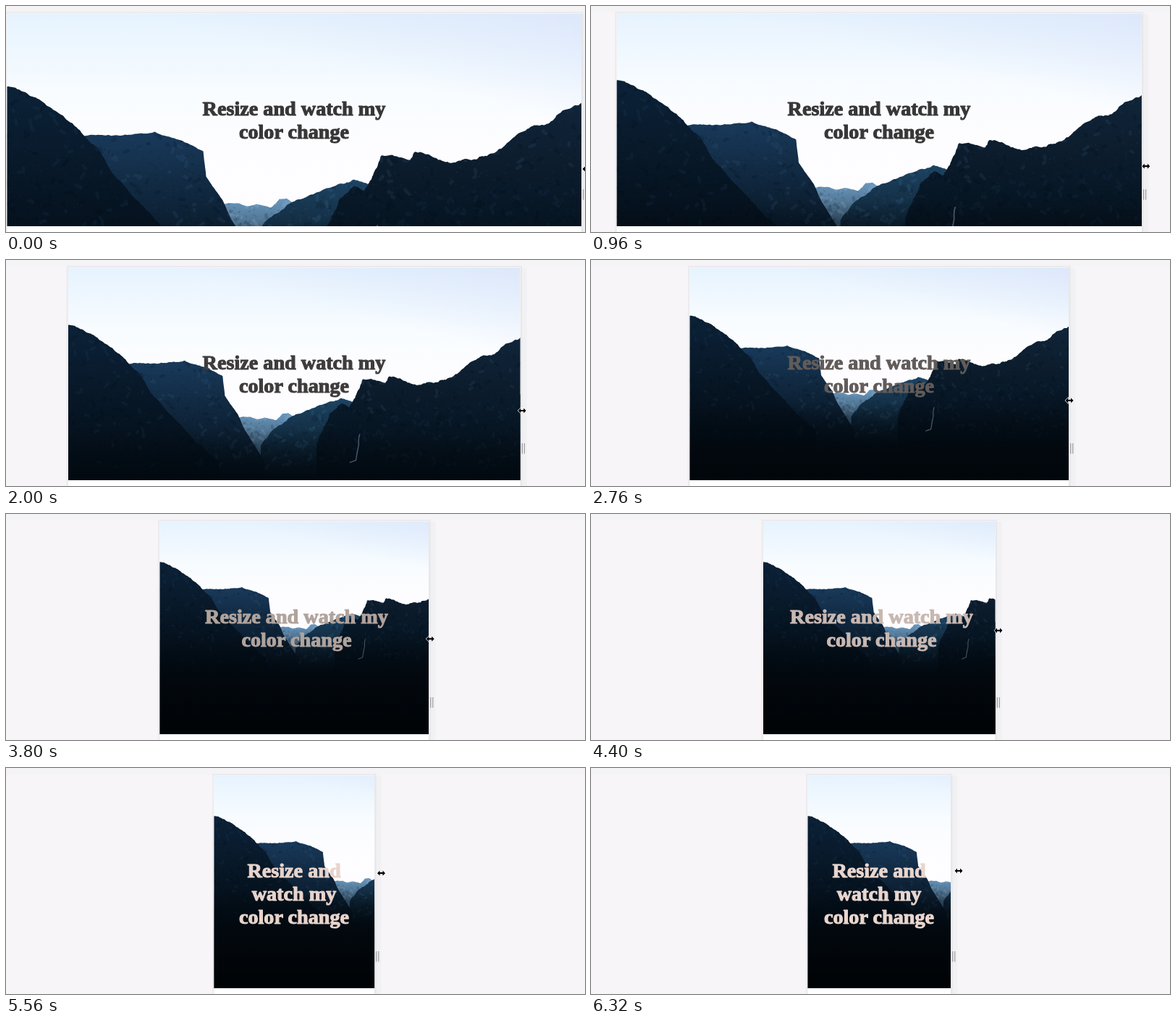
These frames come from a looping animation (800x312 px, 6.36 s). An HTML page:

```html
<!DOCTYPE html>
<html lang="en">
<head>
<meta charset="utf-8">
<title>Resize and watch my color change</title>
<style>
html, body { margin: 0; width: 100%; height: 100%; overflow: hidden; background: #f7f5f8; }
svg { display: block; }
#title { font: bold 28.2px "Liberation Serif", "Times New Roman", serif; text-anchor: middle; stroke-width: 1.1; stroke-linejoin: round; }
</style>
</head>
<body>
<svg id="stage" width="800" height="312" viewBox="0 0 800 312">
  <rect width="800" height="312" fill="#f7f5f8"/>
  <rect width="800" height="9" fill="#f4f3f5"/>
  <rect id="strip" y="10.5" height="302" fill="#f1f0f2"/>
  <rect id="shadow" y="9.5" height="330" fill="none" stroke="#000" stroke-width="3" opacity=".04"/>
  <rect id="card" y="10.5" height="310" fill="#fff"/>
  <svg id="photo" y="10.5" height="293.5" overflow="hidden"><g id="scene"></g></svg>
  <g id="title"></g>
  <path id="handle" d="M-1.5 253V267.5M1.5 253V267.5" stroke="#8c8b8d"/>
  <path id="cursor" d="M-5.5 0L-2 -3.6V-1.1H2V-3.6L5.5 0L2 3.6V1.1H-2V3.6Z" stroke="#fff" stroke-width="1.2" paint-order="stroke"/>
</svg>
<script>
const NS = 'http://www.w3.org/2000/svg';
const LOOP = 6360, STEP = 40;
const PHOTO_W = 793.5, PHOTO_H = 529, MIN_SCALE = 293.5 / PHOTO_H;
const $ = id => document.getElementById(id);
const clamp = v => Math.max(0, Math.min(1, v));
const mix = (a, b, u) => a + (b - a) * u;

function set(el, attrs) {
  for (const key in attrs) el.setAttribute(key, attrs[key]);
}
function add(parent, tag, attrs = {}) {
  const el = document.createElementNS(NS, tag);
  set(el, attrs);
  parent.append(el);
  return el;
}

let seed = 7;
const random = () => (seed = seed * 16807 % 2147483647) / 2147483647;
const spread = size => (random() - .5) * size;

// ---- landscape, in photo units ----
const scene = $('scene'), defs = add(scene, 'defs');

// Vertical gradient; each stop is [y, color, opacity].
function gradient(id, ...stops) {
  const g = add(defs, 'linearGradient', { id, gradientUnits: 'userSpaceOnUse', x1: 0, x2: 0, y1: 0, y2: PHOTO_H });
  for (const [y, color, opacity = 1] of stops)
    add(g, 'stop', { offset: y / PHOTO_H, 'stop-color': color, 'stop-opacity': opacity });
  return `url(#${id})`;
}

// Midpoint displacement turns a few key points into a rugged line.
function rugged([x, y], [nx, ny], rough) {
  const length = Math.hypot(nx - x, ny - y);
  if (length < 4) return [[nx, ny]];
  const bump = spread(rough * Math.min(2, Math.sqrt(length / 12)));
  const mid = [(x + nx) / 2 + bump * .3, (y + ny) / 2 + bump];
  return [...rugged([x, y], mid, rough), ...rugged(mid, [nx, ny], rough)];
}

function dabs(x0, x1, y0, count, size) {
  let d = '';
  for (let i = 0; i < count; i++)
    d += `M${mix(x0, x1, random()).toFixed(1)} ${mix(y0, 350, random()).toFixed(1)}l${spread(size).toFixed(1)} ${spread(size).toFixed(1)}`;
  return d;
}

function mountain(id, tint, light, rough, outline) {
  const points = outline.split(' ').map(p => p.split(',').map(Number));
  const line = points.slice(1).flatMap((p, i) => rugged(points[i], p, rough));
  const x0 = points[0][0], x1 = points.at(-1)[0];
  const top = Math.min(...points.map(p => p[1]));
  const d = `M${points[0]}L${line.map(p => p.map(v => v.toFixed(1))).join('L')}L${x1} ${PHOTO_H}L${x0} ${PHOTO_H}Z`;
  add(scene, 'path', { d, fill: gradient(id, [top, tint], [385, '#020a11']) });

  add(add(defs, 'clipPath', { id: id + 'Clip' }), 'path', { d });
  const texture = add(scene, 'g', { 'clip-path': `url(#${id}Clip)`, 'stroke-linecap': 'round' });
  for (const stroke of ['#000a14', light])
    for (const size of [4, 14])
      add(texture, 'path', { d: dabs(x0, x1, top, (x1 - x0) * 4 / size, size), stroke, 'stroke-width': size / 3, opacity: .16 });
}

add(scene, 'rect', { width: PHOTO_W, height: 320, fill: gradient('sky', [0, '#e6f3fe'], [110, '#f8fcff'], [180, '#fdfdff'], [290, '#fefcfe']) });
const haze = add(defs, 'linearGradient', { id: 'haze', x1: 0, y1: 1, x2: 1, y2: 0 });
add(haze, 'stop', { offset: .6, 'stop-color': '#dbe5fa', 'stop-opacity': 0 });
add(haze, 'stop', { offset: 1, 'stop-color': '#dbe5fa', 'stop-opacity': .8 });
add(scene, 'rect', { width: PHOTO_W, height: 190, fill: 'url(#haze)' });

mountain('dome', '#6a98be', '#b5d2ea', 1.5, '295,263 321,262 332,266 344,263 364,268 376,256 386,255 410,271');
mountain('hill', '#1d4463', '#4f7fa3', 2, '338,312 361,283 394,260 439,242 479,229 525,248');
mountain('captain', '#193a5b', '#3d6288', 1.5, '90,171 134,168 173,167 204,163 231,172 271,190 275,225 298,258 309,283 345,340');
mountain('cathedral', '#11263b', '#3d6288', 3, '485,258 504,227 517,196 532,195 557,202 562,192 570,191 611,206 674,192 719,159 751,149 774,132 804,116');
mountain('forest', '#0a1c2d', '#24425c', 3, '436,310 458,258 479,238 512,252 549,258 605,246 685,236 804,222');
mountain('slope', '#0c2238', '#25486b', 3, '-8,99 17,105 48,121 64,133 107,169 126,186 145,220 187,265 217,298 265,340');

add(scene, 'rect', { y: 285, width: PHOTO_W, height: 250, fill: gradient('dusk', [285, '#020b13', 0], [390, '#02080e', .95], [500, '#010407']) });
add(scene, 'path', { d: 'M512 292Q509 298 510 310L507 326L505 338L494 342', fill: 'none', stroke: '#9db4c9', 'stroke-width': 1.8, opacity: .45 });

// ---- motion ----
// The hand drags at an uneven pace: time, left edge of the card.
const DRAG = [[0, 1.5], [1280, 47], [2000, 86], [2500, 110], [2760, 136.5], [3200, 174], [3800, 212.5], [5000, 263.5], [5760, 296], [6320, 299.5]];
const DARK = [56, 55, 55], LIGHT = [234, 215, 207];
const GRIP = 4.3;

function cardLeft(time) {
  const i = Math.max(1, DRAG.findIndex(([t]) => t >= time));
  const [t0, x0] = DRAG[i - 1], [t1, x1] = DRAG[i];
  return mix(x0, x1, (time - t0) / (t1 - t0));
}

function inkFor(width) {
  const u = clamp((680 - width) / 500), eased = u * u * (3 - 2 * u);
  return `rgb(${DARK.map((c, i) => Math.round(mix(c, LIGHT[i], eased)))})`;
}

function wrap(width) {
  if (width > 300) return ['Resize and watch my', 'color change', ''];
  if (width > 250) return ['Resize and watch', 'my color change', ''];
  return ['Resize and', 'watch my', 'color change'];
}

const lines = [0, 1, 2].map(i => add($('title'), 'text', { y: 150.6 + i * 32 }));

function draw(time) {
  const u = time / (LOOP - STEP);
  const x = cardLeft(time), right = 796.5 - x, width = right - x;
  const cursorX = right + 7 + 4 * u - 8 * Math.sin(Math.PI * u) ** 2;
  const cursorY = 183.5 + 41.5 * Math.cos(Math.PI * u ** 1.05);

  set($('card'), { x, width });
  set($('photo'), { x, width });
  set($('shadow'), { x: x - 1, width: width + 2 });
  set($('strip'), { x: right, width: GRIP + 5 });
  set(scene, { transform: `scale(${Math.max(width / PHOTO_W, MIN_SCALE)})` });
  set($('handle'), { transform: `translate(${right + GRIP} 0)` });
  set($('cursor'), { transform: `translate(${cursorX} ${cursorY})` });

  const ink = inkFor(width);
  set($('title'), { fill: ink, stroke: ink });
  const drift = width > 300 ? 3.5 * clamp((500 - width) / 126) : 0;
  wrap(width).forEach((text, i) => {
    if (lines[i].textContent !== text) lines[i].textContent = text;
    set(lines[i], { x: 398 + drift });
  });
}

const start = performance.now();
function tick() {
  const time = (performance.now() - start) % LOOP;
  draw(Math.floor(time / STEP) * STEP);
  requestAnimationFrame(tick);
}
tick();
</script>
</body>
</html>
```
